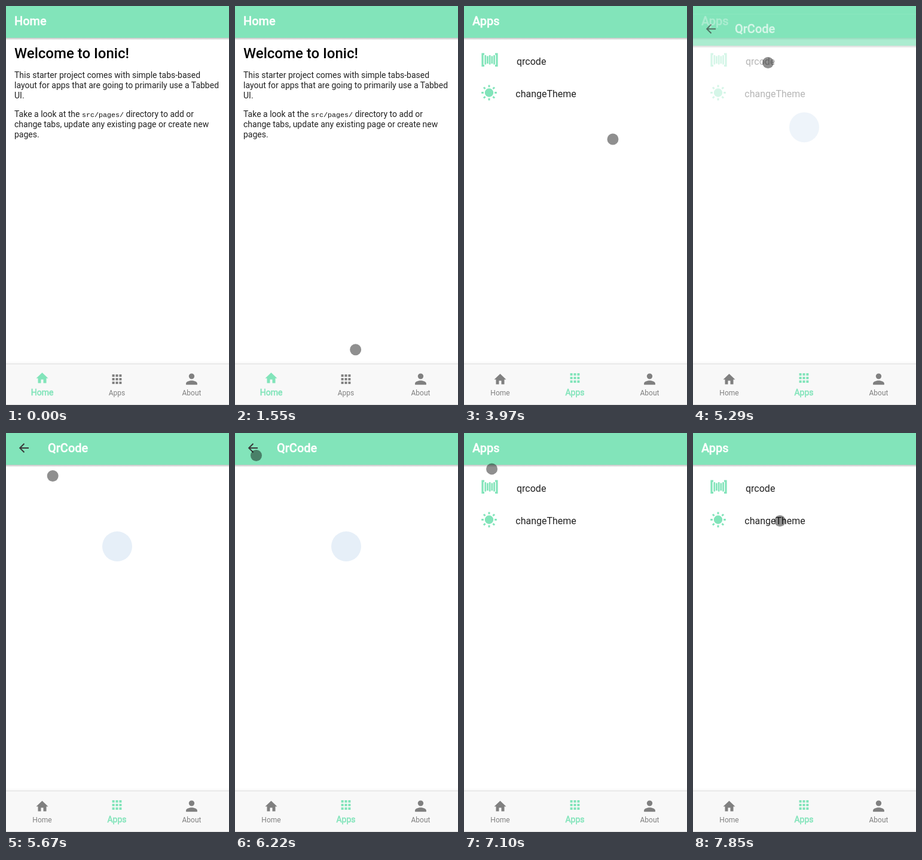
An HTML page that plays this animation: 373 px wide and 665 px high, repeating every 8 s.

```html
<!DOCTYPE html>
<html lang="en">
<head>
<meta charset="utf-8">
<title>Tabs app</title>
<style>
  html, body { margin: 0; width: 100%; height: 100%; overflow: hidden; background: #fff; }
  svg { display: block; width: 100%; height: 100%; font-family: Roboto, sans-serif; }
  .title { font-size: 20px; font-weight: 500; fill: #fff; stroke: #fff; stroke-width: .35px; }
  .body { font-size: 14px; fill: #222; }
  .item { font-size: 16px; fill: #222; }
  .code { font: 11.67px "Liberation Mono", monospace; fill: #111; }
  .tab { font-size: 12px; text-anchor: middle; }
</style>
</head>
<body>
<svg viewBox="0 0 373 665" xmlns="http://www.w3.org/2000/svg">
  <defs>
    <linearGradient id="shade" x2="0" y2="1">
      <stop offset="0" stop-color="#000" stop-opacity=".24"/>
      <stop offset="1" stop-color="#000" stop-opacity="0"/>
    </linearGradient>
    <g id="bar">
      <rect width="373" height="665" fill="#fff"/>
      <rect y="53" width="373" height="4" fill="url(#shade)"/>
      <rect width="373" height="53" fill="#82e4ba"/>
    </g>
  </defs>

  <g id="home">
    <use href="#bar"/>
    <text class="title" x="14" y="32">Home</text>
    <text x="14" y="87" font-size="24" font-weight="500">Welcome to Ionic!</text>
    <g class="body">
      <text x="14" y="120">This starter project comes with simple tabs-based</text>
      <text x="14" y="137">layout for apps that are going to primarily use a Tabbed</text>
      <text x="14" y="154">UI.</text>
      <text x="14" y="185">Take a look at the</text>
      <text x="127" y="185" class="code">src/pages/</text>
      <text x="200.5" y="185">directory to add or</text>
      <text x="14" y="202">change tabs, update any existing page or create new</text>
      <text x="14" y="219">pages.</text>
    </g>
  </g>

  <g id="apps">
    <use href="#bar"/>
    <text class="title" x="14" y="32">Apps</text>
    <g id="bars" fill="#82e4ba">
      <path d="M34 80H31V99.500H34M52 80H55V99.500H52" fill="none" stroke="#82e4ba" stroke-width="3.200"/>
    </g>
    <g id="sun" transform="translate(42 144.500)" fill="#82e4ba"><circle r="7.200"/></g>
    <text class="item" x="88" y="98">qrcode</text>
    <text class="item" x="86.300" y="152">changeTheme</text>
  </g>

  <g id="detail">
    <use href="#bar"/>
    <path d="M38 25H23.500M30.500 17.700L23.200 25L30.500 32.300" fill="none" stroke="#3a3a3a" stroke-width="2"/>
    <text class="title" x="70" y="32">QrCode</text>
    <circle cx="186" cy="189" r="25" fill="#e6eff8"/>
  </g>

  <rect y="593" width="373" height="4" fill="#000" opacity=".02"/>
  <rect y="596" width="373" height="69" fill="#f8f8f8"/>
  <path d="M0 596.500h373M0 664.500h373" stroke="#dcdcdc"/>
  <g id="tabs"></g>

  <g id="status">
    <path d="M-1 642.500h119q3.500 0 3.500 3.500v20h-122.500z" fill="#ebf1ee" stroke="#cbd3cf"/>
    <text x="1" y="658" font-size="12" fill="#5f6663" font-family="'Noto Sans CJK SC', 'Noto Sans CJK', sans-serif">正在连接...</text>
  </g>
  <circle id="cursor" r="9.500" fill-opacity=".44"/>
</svg>

<script>
const LOOP = 8000, GREEN = '#82e4ba', GREY = '#808080';
const NS = 'http://www.w3.org/2000/svg';
const $ = id => document.getElementById(id);
const set = (el, attrs) => { for (const k in attrs) el.setAttribute(k, attrs[k]); return el; };
const add = (parent, tag, attrs) => parent.appendChild(set(document.createElementNS(NS, tag), attrs));
const show = (el, on) => set(el, { display: on ? 'inline' : 'none' });
const span = (t, start, length) => Math.max(0, Math.min(1, (t - start) / length));

const TAP_TAB = 2820, PUSH = 5223, POP = 6664;

// Pointer moves: each bends from where the last one ended towards "to".
const moves = [
  { at: 1240, ms: 480, from: [9, 433], bend: [285, 560], to: [168, 628] },
  { at: 1840, ms: 180, to: [188.5, 639.5] },
  { at: 3520, ms: 70, to: [284.5, 583.5], hideAt: 3670 },
  { at: 3970, ms: 560, from: [249.5, 222.5], bend: [100, 105], to: [125.5, 94.5] },
  { at: 5600, ms: 220, bend: [43, 60], to: [17.5, 18] },
  { at: 5970, ms: 250, to: [35.5, 37.5] },
  { at: 7060, ms: 790, bend: [145, 262], to: [145.5, 146.5] }
];
moves.forEach((m, i) => {
  m.from = m.from || moves[i - 1].to;
  m.bend = m.bend || m.to.map((v, axis) => (v + m.from[axis]) / 2);
});

function pointer(t) {
  const m = moves.filter(move => move.at <= t).pop();
  if (!m || t >= m.hideAt) return null;
  const p = span(t, m.at, m.ms), q = 1 - p;
  return m.to.map((v, axis) => q * q * m.from[axis] + 2 * p * q * m.bend[axis] + p * p * v);
}

function bezier(x1, y1, x2, y2) {
  const at = (a, b, s) => 3 * a * s * (1 - s) ** 2 + 3 * b * s * s * (1 - s) + s ** 3;
  return x => {
    let lo = 0, hi = 1;
    for (let i = 0; i < 20; i++) {
      const mid = (lo + hi) / 2;
      if (at(x1, x2, mid) < x) lo = mid; else hi = mid;
    }
    return at(y1, y2, (lo + hi) / 2);
  };
}
const pushEase = bezier(.36, .66, .04, 1);
const popEase = bezier(.47, 0, .745, .715);
const tabEase = bezier(.42, 0, .58, 1);

for (let i = 0; i < 5; i++) {
  const inset = i % 2 * 1.5;
  add($('bars'), 'rect', { x: 34.4 + i * 3.7, y: 82 + inset, width: 2.7, height: 15.5 - 2 * inset });
}
for (let a = 0; a < 360; a += 45)
  add($('sun'), 'rect', { x: -1.5, y: -12.8, width: 3, height: 3.6, transform: `rotate(${a})` });

let grid = '';
for (let i = 0; i < 9; i++) grid += `M${-7.9 + i % 3 * 5.9} ${-7.9 + Math.floor(i / 3) * 5.9}h4v4h-4z`;
const house = 'M-2 8.5v-6h4v6h5v-8h3L0-9-10 .5h3v8z';
const person = 'M0-.2a4.7 4.7 0 1 0 0-9.4a4.7 4.7 0 0 0 0 9.4z' +
  'M0 2.2c-3.1 0-9.4 1.6-9.4 4.7v2.4h18.8v-2.4c0-3.1-6.3-4.7-9.4-4.7z';

const tabs = [['Home', house], ['Apps', grid], ['About', person]].map(([name, d], i) => {
  const icon = add($('tabs'), 'path', { d });
  const label = add($('tabs'), 'text', { class: 'tab' });
  label.textContent = name;
  return { x: 60.5 + 125 * i, icon, label };
});

function drawTab({ x, icon, label }, active, grow) {
  const fill = active ? GREEN : GREY;
  set(icon, { fill, transform: `translate(${x} ${622 - 2 * grow})` });
  set(label, { fill, stroke: fill, 'stroke-width': .5 * grow,
    transform: `translate(${x} 649) scale(${1 + grow / 6})` });
}

function draw(t) {
  const onApps = t >= TAP_TAB;
  show($('home'), !onApps);
  show($('apps'), onApps);

  const page = pushEase(span(t, PUSH, 280)) - popEase(span(t, POP, 200));
  show($('detail'), page > .001);
  set($('detail'), { opacity: page, transform: `translate(0 ${40 * (1 - page)})` });

  const swap = tabEase(span(t, TAP_TAB, 300));
  drawTab(tabs[0], !onApps, 1 - swap);
  drawTab(tabs[1], onApps, swap);
  drawTab(tabs[2], false, 0);

  const fade = 1 - span(t, TAP_TAB + 240, 210);
  show($('status'), onApps && fade > 0);
  set($('status'), { opacity: fade });

  const spot = pointer(t);
  show($('cursor'), spot);
  if (spot) set($('cursor'), { cx: spot[0], cy: spot[1] });
}

const start = performance.now();
function tick() {
  draw((performance.now() - start) % LOOP);
  requestAnimationFrame(tick);
}
tick();
</script>
</body>
</html>
```
